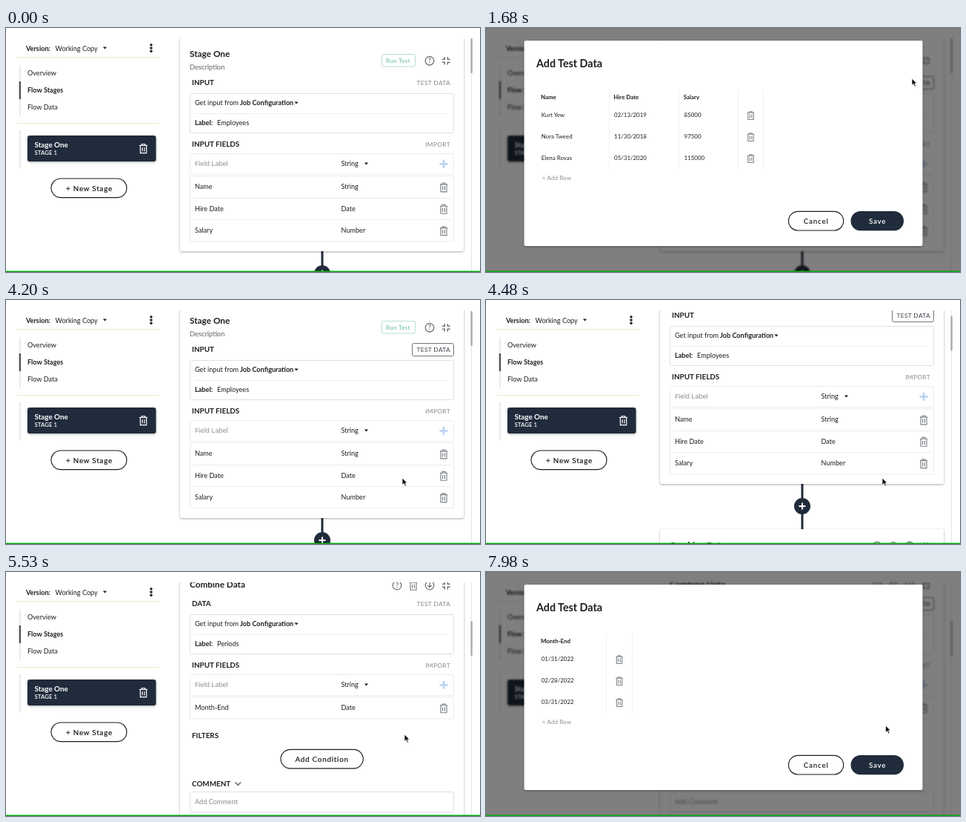
An HTML page for the animation above (8 s loop, 640x329 px).

```html
<!DOCTYPE html>
<html lang="en">
<head>
<meta charset="utf-8">
<title>Add Test Data</title>
<style>
html, body { margin: 0; width: 100%; height: 100%; overflow: hidden; background: #fff; }
svg { display: block; width: 640px; height: 329px; }
text { font: 9.15px Lato, sans-serif; fill: #1b1e23; white-space: pre; }
.b { font-weight: 700; }
.title { font-size: 11.8px; font-weight: 700; }
.head { font-size: 9.9px; font-weight: 700; }
.link { font-size: 8.4px; letter-spacing: .33px; fill: #85898e; text-anchor: end; }
.hint { fill: #868a8f; }
.desc { font-size: 9.3px; fill: #7a7e83; stroke: #7a7e83; stroke-width: .2; }
.field { font-family: "Liberation Sans", Arial, sans-serif; fill: #8d9196; }
.btn { font-size: 9.9px; letter-spacing: .74px; text-anchor: middle; stroke: #1b1e23; stroke-width: .22; }
.mid { font-weight: 600; stroke: none; }
.small { font-size: 7.9px; }
.big { font-size: 14.3px; font-weight: 700; }
.white { fill: #fff; }
.name { font-size: 9.85px; }
.run { font-size: 8.1px; font-weight: 700; letter-spacing: .25px; fill: #84cbae; }
.box { fill: #fff; stroke: #dfe0e2; }
.rows { fill: #fff; stroke: #ececee; }
.rule { stroke: #ececee; fill: none; }
.card { fill: #fff; filter: drop-shadow(0 1px 1.8px rgba(0, 0, 0, .34)); }
.pill { fill: #fff; stroke: #1b1e23; stroke-width: 1.15; }
.icon { fill: none; stroke: #707479; stroke-width: 1.3; }
</style>
</head>
<body>
<svg id="stage" viewBox="0 0 640 329"></svg>
<script>
const INK = '#202b3b', LOOP = 8000, STEP = 70;
const $ = id => document.getElementById(id);

// Markup helpers
const text = (x, y, s, cls = '') => `<text x="${x}" y="${y}" class="${cls}">${s}</text>`;
const rect = (x, y, w, h, cls, r = 0, extra = '') =>
  `<rect x="${x}" y="${y}" width="${w}" height="${h}" rx="${r}" class="${cls}" ${extra}/>`;
const path = (d, extra = 'class="rule"') => `<path d="${d}" ${extra}/>`;
const at = (x, y, s) => `<g transform="translate(${x} ${y})">${s}</g>`;
const caret = (x, y) => path(`M${x - 2.6} ${y - 1.4}h5.2l-2.6 3z`, 'fill="#1b1e23"');

const trash = (x, y, k = 1, color = '#7c8085') => at(x, y,
  `<g transform="scale(${k})">` +
  path('M-5.2 -4H5.2M-2 -4V-5.8H2V-4M-4 -4V6H4V-4M-1.4 -1.5V3.8M1.4 -1.5V3.8',
    `fill="none" stroke="${color}" stroke-width="1.15"`) + '</g>');

const help = (x, y) => `<circle cx="${x}" cy="${y}" r="5.8" class="icon"/>` +
  `<text x="${x}" y="${y + 3.1}" style="font-size:8.8px;font-weight:700;fill:#707479;text-anchor:middle">?</text>`;

const shrink = (x, y) => at(x, y,
  path('M-5.3 -2H-2V-5.3M5.3 -2H2V-5.3M-5.3 2H-2V5.3M5.3 2H2V5.3', 'class="icon" style="stroke-width:1.5"'));

const download = (x, y) => at(x, y, '<circle r="5.8" class="icon"/>' +
  path('M0 -6.5V2.6M-2.6 0L0 2.6L2.6 0', 'class="icon"'));

// Input block whose heading is centred on y
function inputs(y, name, label, rows, hoverId) {
  const top = y + 126;
  let s = text(251, y + 3.3, name, 'head') +
    `<g id="${hoverId}" opacity="0">` + rect(548.5, y - 8.5, 56, 17, 'box', 2, 'style="stroke:#6f757d"') + '</g>' +
    `<text id="${hoverId}Text" x="600" y="${y + 3.4}" class="link">TEST DATA</text>` +
    rect(248.5, y + 14.5, 356, 53, 'box', 1) + path(`M255 ${y + 41.5}H598`) +
    text(255, y + 30.4, 'Get input from') + text(316, y + 30.4, 'Job Configuration', 'b') + caret(392, y + 27) +
    text(255, y + 57.2, 'Label:', 'b') + text(285, y + 57.2, label) +
    text(251, y + 86.2, 'INPUT FIELDS', 'head') + text(600, y + 86.2, 'IMPORT', 'link') +
    rect(248.5, y + 95.5, 356, 28, 'rows', 1) + text(255, y + 112.3, 'Field Label', 'field') +
    text(452.5, y + 112.2, 'String') + caret(486.5, y + 109) +
    path(`M585.5 ${y + 109.3}h11M591 ${y + 103.8}v11`, 'stroke="#bfd4f1" stroke-width="2.8"') +
    rect(248.5, top - .5, 356, rows.length * 29.4, 'rows', 1);
  rows.forEach(([field, type], i) => {
    const cy = top + 14.1 + i * 29.4;
    if (i) s += path(`M252 ${Math.round(cy - 15) + .5}H601`);
    s += text(255, cy + 3.1, field) + text(452.5, cy + 3.1, type) + trash(591, cy + .7);
  });
  return s;
}

const sidebar =
  text(27, 30.5, 'Version:', 'b') + text(66.5, 30.5, 'Working Copy') + caret(133.5, 27) +
  [22.7, 27, 31.3].map(y => `<circle cx="196" cy="${y}" r="1.7" fill="#1b1e23"/>`).join('') +
  path('M15 39.5H207M15 128.5H207', 'stroke="#f5e8d4"') +
  path('M19 50V119M19 138V190', 'stroke="#dfe5ec" stroke-width="1.5"') +
  path('M18.8 72V96', 'stroke="#1b1e23" stroke-width="1.6"') +
  text(29, 64.2, 'Overview') + text(29, 87.3, 'Flow Stages', 'b') + text(29, 110.4, 'Flow Data') +
  rect(29, 145, 173.5, 35, 'card', 3, `style="fill:${INK}"`) +
  text(38.5, 160.7, 'Stage One', 'b white name') + text(38.5, 171.2, 'STAGE 1', 'small white mid') +
  trash(185.5, 162.5, 1.03, '#fff') +
  rect(61, 203, 102, 25.6, 'pill', 12.8) + text(112.5, 219.5, '+ New Stage', 'btn');

const flow =
  path('M427 300V363', `stroke="${INK}" stroke-width="3"`) +
  rect(235, 13, 383, 288, 'card', 2) +
  text(248, 39, 'Stage One', 'title') + text(248, 55.7, 'Description', 'desc') +
  rect(507.5, 35.5, 45, 16.5, 'box', 2, 'style="stroke:#b4dfce"') + text(513, 46.8, 'Run Test', 'run') +
  help(572, 44.2) + shrink(594.3, 44.3) +
  inputs(74, 'INPUT', 'Employees', [['Name', 'String'], ['Hire Date', 'Date'], ['Salary', 'Number']], 'hover1') +
  `<circle cx="427" cy="331" r="11" fill="${INK}"/>` +
  path('M422.5 331h9M427 326.5v9', 'stroke="#fff" stroke-width="2"') +
  rect(235, 362, 383, 420, 'card', 2) +
  text(248, 388, 'Combine Data', 'title') +
  help(528, 385) + trash(550, 385.3) + download(572, 385) + shrink(594.3, 385.3) +
  inputs(410, 'DATA', 'Periods', [['Month-End', 'Date']], 'hover2') +
  text(251, 590.5, 'FILTERS', 'head') +
  rect(371, 606.3, 111.3, 25.6, 'pill', 12.8) + text(426.6, 622.8, 'Add Condition', 'btn') +
  text(251, 655.7, 'COMMENT', 'head') +
  path('M309.5 650.5L313.3 654.3L317.1 650.5', 'class="icon" style="stroke-width:1.7"') +
  rect(248.5, 663.5, 356, 27, 'box', 1) + text(255, 679.7, 'Add Comment', 'hint');

// Table: columns are [x, heading, cells]
function table(cols, lines, binX) {
  return cols.map(([x, head, cells]) => text(x, 95.7, head, 'small b') +
      cells.map((c, i) => text(x + .8, 119.7 + i * 29.1, c, 'small')).join('')).join('') +
    lines.map(x => path(`M${x} 82V190`, 'stroke="#f0f0f1"')).join('') +
    [118, 147, 176].map(y => trash(binX, y, .92)).join('');
}

const dialog =
  rect(51.5, 17, 538, 277, 'card', 2) + text(68, 53.3, 'Add Test Data', 'big') +
  '<g id="people">' + table([
    [74, 'Name', ['Kurt Yew', 'Nora Tweed', 'Elena Rovas']],
    [172.3, 'Hire Date', ['02/13/2019', '11/30/2018', '05/31/2020']],
    [266.8, 'Salary', ['85000', '97500', '115000']]
  ], [166.5, 260.5, 340.5, 374.5], 357.5) + '</g>' +
  '<g id="months">' + table([
    [74, 'Month-End', ['01/31/2022', '02/28/2022', '03/31/2022']]
  ], [162.5, 197.5], 180) + '</g>' +
  '<text x="75.8" y="204.8" class="small" style="fill:#8d9094;letter-spacing:.2px">+ Add Row</text>' +
  rect(408.5, 247.4, 74.2, 25.6, 'pill', 12.8) + text(445.7, 263.9, 'Cancel', 'btn mid') +
  rect(492.5, 247, 71.5, 26.3, '', 13.1, 'id="save"') + text(528.6, 263.9, 'Save', 'btn mid white');

const arrow = path('M0 0V9.3L2.2 7.4L3.8 11L5.4 10.3L3.9 6.8H6.8Z',
  'id="arrow" fill="#111" stroke="#fff" stroke-width=".7"');
const hand = path('M-1 0C-1 -1.3 1 -1.3 1 0V4L4.6 4.8Q5.6 5.1 5.4 6.3L4.6 10H-1.2L-4 6.2Q-4.2 4.6 -2.7 5.2L-1 6.4Z',
  'id="hand" fill="#fff" stroke="#111" stroke-width=".9"');

$('stage').innerHTML =
  '<clipPath id="pane"><rect x="225" y="14" width="415" height="315"/></clipPath>' +
  rect(0, 0, 640, 329, 'white') +
  '<g id="page">' + sidebar + `<g clip-path="url(#pane)"><g id="flow">${flow}</g></g>` +
  path('M628.5 14V328', 'stroke="#e3e4e6"') +
  rect(627.5, 14, 2.2, 47, '', 1, 'id="thumb" fill="#a3a5aa"') + '</g>' +
  `<g id="modal">${rect(0, 0, 640, 329, '', 0, 'fill="#000" opacity=".5"')}${dialog}</g>` +
  rect(0, 327.5, 640, 1.5, '', 0, 'fill="#08a80c"') +
  `<g id="cursor">${arrow}${hand}</g>`;

// Keys: [ms, value, ...]
const scrollKeys = [[4130, 0], [4270, 14], [4480, 53], [4620, 68], [4830, 68], [4970, 130],
  [5180, 318], [5320, 352], [5390, 352], [5530, 367]];
const cursorKeys = [[770, 379, -12], [1050, 470, 30], [1330, 562, 68], [1540, 577, 73], [1610, 577, 73],
  [1680, 575, 68], [2450, 575, 68], [2660, 566, 120], [2870, 542, 225], [3080, 529, 260],
  [3500, 529, 261], [3570, 530, 258], [3780, 535, 240], [5390, 535, 240], [5530, 538, 219],
  [5810, 556, 120], [6090, 574, 55], [6230, 575, 47], [7490, 575, 47], [7700, 565, 98], [7980, 539.5, 207]];

function track(keys, t) {
  if (t <= keys[0][0]) return keys[0].slice(1);
  const i = keys.findIndex(k => k[0] > t);
  if (i < 0) return keys[keys.length - 1].slice(1);
  const a = keys[i - 1], b = keys[i], u = (t - a[0]) / (b[0] - a[0]);
  return a.slice(1).map((v, j) => v + (b[j + 1] - v) * u);
}
const within = (t, a, b) => t >= a && t < b;
const ramp = (t, a, b) => Math.min(1, Math.max(0, (t - a) / (b - a)));
const show = (id, on) => $(id).setAttribute('visibility', on ? 'inherit' : 'hidden');

function hover(id, k) {
  $(id).setAttribute('opacity', k);
  const mix = (a, b) => Math.round(a + (b - a) * k);
  $(id + 'Text').style.fill = `rgb(${mix(133, 60)},${mix(137, 67)},${mix(142, 77)})`;
}

function draw(ms) {
  const t = Math.floor(ms / STEP) * STEP;
  const [scroll] = track(scrollKeys, t), [x, y] = track(cursorKeys, t);
  const first = within(t, 1680, 3570), second = t >= 6860, open = first || second;
  const pointing = within(t, 1400, 1680) || within(t, 3080, 3570) || within(t, 6370, 6860);

  $('flow').setAttribute('transform', `translate(0 ${-scroll})`);
  $('thumb').setAttribute('y', 14 + scroll * .142);
  $('page').style.filter = open ? 'blur(1.2px)' : 'none';
  hover('hover1', ramp(t, 1330, 1540));
  hover('hover2', ramp(t, 6300, 6580));

  $('modal').setAttribute('visibility', open ? 'visible' : 'hidden');
  show('people', first);
  show('months', second);
  $('save').setAttribute('fill', within(t, 3080, 3570) ? '#455363' : INK);

  $('cursor').setAttribute('transform', `translate(${x} ${y})`);
  $('cursor').setAttribute('visibility', t >= 840 ? 'visible' : 'hidden');
  show('arrow', !pointing);
  show('hand', pointing);
}

const start = performance.now();
function tick() {
  draw((performance.now() - start) % LOOP);
  requestAnimationFrame(tick);
}
draw(0);
tick();
</script>
</body>
</html>
```
